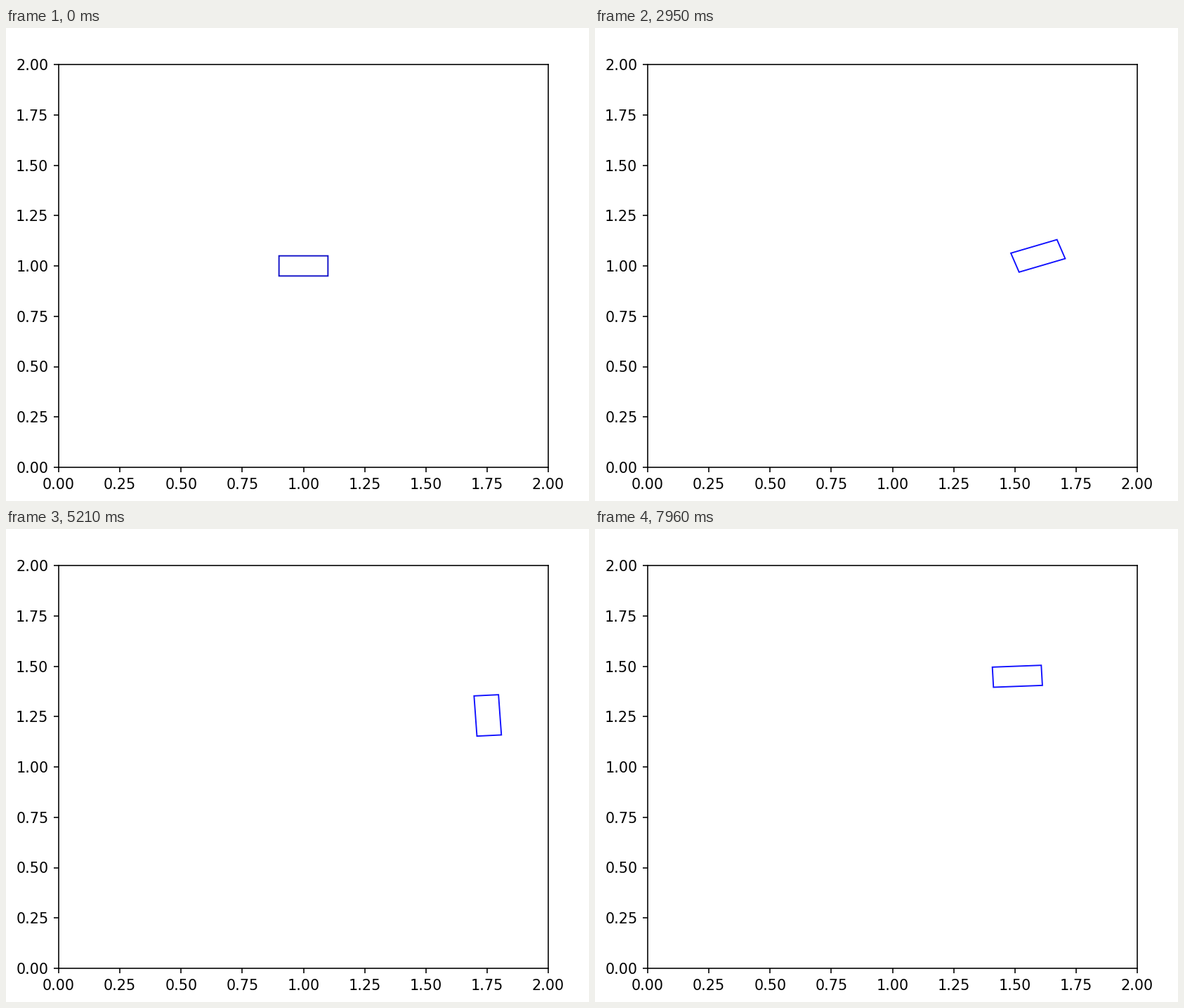
These frames come from a looping animation (830x674 px, 8000 ms). A matplotlib script:

```python
import numpy as np
import matplotlib.pyplot as plt
from matplotlib.animation import FuncAnimation
from matplotlib.lines import Line2D
from matplotlib.patches import Polygon

WIDTH, HEIGHT = 830, 674
DPI = 72  # one point is one pixel
LOOP, INTERVAL = 8000, 40
START, STEP_TIME = 1025, 79.8  # ms; the car moves once per step
STEPS = 87
CAR_LENGTH, CAR_WIDTH = 0.2, 0.1


def drive():
    """Return heading and centre of the car after every step."""
    step = np.arange(1, STEPS + 1)
    # Brake from cruising to crawling, then turn the wheel in and release it
    speed = np.interp(step, [17, 20], [0.03, 0.01])
    curvature = np.interp(step, [9, 10, 22, 32, 77, STEPS], [0, 1, 1, 5, 5, 1.5])
    heading = np.append(0, np.cumsum(speed * curvature))
    moves = speed * np.array([np.cos(heading[:-1]), np.sin(heading[:-1])])
    centre = np.vstack([[1, 1], 1 + np.cumsum(moves, axis=1).T])
    return heading, centre


def car_outline(centre, angle):
    corners = np.array([(-1, -1), (1, -1), (1, 1), (-1, 1)])
    corners = corners * (CAR_LENGTH / 2, CAR_WIDTH / 2)
    c, s = np.cos(angle), np.sin(angle)
    return centre + corners @ np.array([(c, s), (-s, c)])


heading, centre = drive()

fig = plt.figure(figsize=(WIDTH / DPI, HEIGHT / DPI), dpi=DPI, facecolor="white")
left, right, top, bottom = 75, 772, 52, 626
ax = fig.add_axes([left / WIDTH, 1 - bottom / HEIGHT,
                   (right - left) / WIDTH, (bottom - top) / HEIGHT])
ticks = np.linspace(0, 2, 9)
labels = [f"{v:.2f}" for v in ticks]
ax.set(xlim=(0, 2), ylim=(0, 2))
ax.set_xticks(ticks, labels)
ax.set_yticks(ticks, labels)
ax.tick_params(length=7.3, width=1.6, pad=7.3, labelsize=20.8,
               labelfontfamily="DejaVu Sans")
for spine in ax.spines.values():
    spine.set_linewidth(1.6)

# Thin window border on the right and at the bottom
edge_x, edge_y = 1 - 0.5 / WIDTH, 0.5 / HEIGHT
fig.add_artist(Line2D([edge_x, edge_x, 0], [1, edge_y, edge_y],
                      color="#c4c4c4", linewidth=1))

car = Polygon(car_outline(centre[0], 0), closed=True, fill=False,
              linewidth=1.9, joinstyle="miter", snap=False)
ax.add_patch(car)


def update(frame):
    elapsed = frame * INTERVAL + 30 - START
    step = int(np.clip(elapsed / STEP_TIME, 0, STEPS))
    car.set_xy(car_outline(centre[step], heading[step]))
    car.set_edgecolor("#1010ff" if step else "#1010c8")
    return [car]


anim = FuncAnimation(fig, update, frames=LOOP // INTERVAL, interval=INTERVAL,
                     repeat=True, repeat_delay=0)
plt.show()
```
